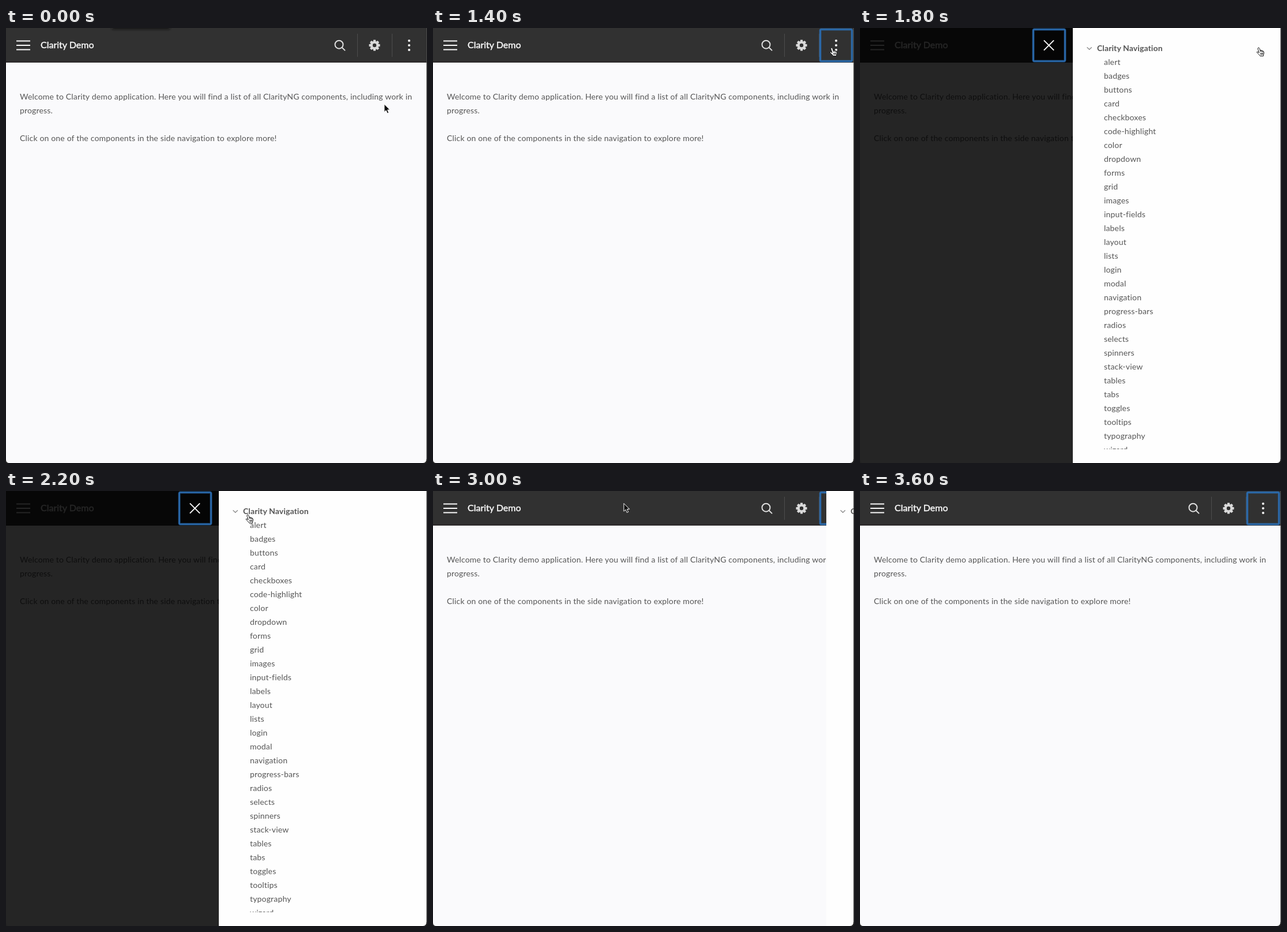
These frames come from a looping animation (730x754 px, 3800 ms). An HTML page:

```html
<!DOCTYPE html>
<html lang="en">
<head>
<meta charset="utf-8">
<title>Side navigation demo</title>
<style>
  html, body { margin: 0; width: 100%; height: 100%; overflow: hidden; background: #fafafc; }
  svg { display: block; width: 730px; height: 754px; }
  text { font: 14px Lato, "Open Sans", sans-serif; letter-spacing: .17px; fill: #565656; }
  .title { font-size: 16px; letter-spacing: 0; fill: #fafafa; stroke: #fafafa; stroke-width: .45px; }
  .head { font-weight: 700; letter-spacing: .1px; }
  .line { fill: none; stroke-linecap: round; stroke-linejoin: round; }
</style>
</head>
<body>
<svg viewBox="0 0 730 754">
  <defs>
    <clipPath id="listClip"><rect y="0" width="361" height="730"/></clipPath>
    <clipPath id="page"><rect width="729" height="754"/></clipPath>
    <filter id="blur" x="-20%" y="-200%" width="140%" height="500%"><feGaussianBlur stdDeviation="2"/></filter>
    <g id="ring" fill="none" stroke="#2b6cb0">
      <rect x="1.5" y="2.5" width="55" height="55" rx="2" stroke-width="4.4" opacity=".4"/>
      <rect x="1.5" y="2.5" width="55" height="55" rx="1.5" stroke-width="2.6"/>
    </g>
  </defs>

  <g clip-path="url(#page)">
    <rect width="730" height="754" fill="#fafafc"/>
    <text x="24" y="124">Welcome to Clarity demo application. Here you will find a list of all ClarityNG components, including work in</text>
    <text x="24" y="148">progress.</text>
    <text x="24" y="196">Click on one of the components in the side navigation to explore more!</text>

    <rect width="730" height="60" fill="#313131"/>
    <rect y="57" width="730" height="3" fill="#2e2c2d"/>
    <rect id="shade" x="184" y="-4" width="100" height="6" fill="#151515" filter="url(#blur)"/>
    <path d="M18 22.5H42M18 30H42M18 37.5H42" stroke="#fafafa" stroke-width="2"/>
    <text class="title" x="60" y="35">Clarity Demo</text>
    <path d="M609.5 10V50M669.5 10V50" stroke="#4c4c4c"/>
    <g class="line" stroke="#dedede" stroke-width="2">
      <circle cx="577.5" cy="28.7" r="7"/>
      <path d="M582.8 34L587.5 38.6"/>
    </g>
    <path id="gear" fill="#dadada" fill-rule="evenodd" transform="translate(639 30)"/>
    <g fill="#f2f2f2">
      <circle cx="699" cy="22" r="2.1"/><circle cx="699" cy="30" r="2.1"/><circle cx="699" cy="38" r="2.1"/>
    </g>
    <use id="menuRing" href="#ring" x="670"/>

    <g id="open">
      <rect width="730" height="754" opacity=".85"/>
      <g id="button">
        <rect x="1" y="2" width="56" height="56" fill="#050505"/>
        <use href="#ring"/>
      </g>
      <g stroke="#fafafa" stroke-width="1.9">
        <path id="barA" d="M-12.2 0H12.2"/><path id="barB" d="M-12.2 0H12.2"/>
      </g>
    </g>

    <g id="panel">
      <rect width="370" height="754" fill="#fefefe"/>
      <path class="line" d="M25 33.8L28.7 37.2L32.4 33.8" stroke="#8c8c8c" stroke-width="1.4"/>
      <text class="head" x="42" y="40">Clarity Navigation</text>
      <g id="list" clip-path="url(#listClip)"></g>
    </g>
  </g>

  <path d="M729.5 0V754" stroke="#4a4a4a"/>
  <path d="M0 754V748Q0 754 6 754ZM730 754H723Q729 754 729 747H730Z" fill="#222"/>

  <path id="arrow" d="M.4 0V13.7L3.5 10.8L5.7 15.9L8.2 14.8L6 9.9H10.2Z" fill="#0c0c0c" stroke="#fff" stroke-width="1" stroke-linejoin="round"/>
  <g id="hand" stroke="#111" stroke-width="1" stroke-linejoin="round" stroke-linecap="round">
    <path fill="#fff" d="M4.8 9L2.9 3.4Q2.5 1.4 3.8 1.1Q5.1 .8 5.8 2.6L7 6Q8.1 5.1 9 6.2Q10.3 5.5 11.1 6.9Q12.9 6.6 13.3 9Q13.7 12 12.6 13.5L12.4 15.6H6.8Q6 13.9 3.5 11.7Q.7 9.5 1.2 8.5Q2 7.3 4.8 9.7Z"/>
    <path fill="none" d="M7 6L7.6 8M9 6.2L9.5 8.1M11.1 6.9L11.5 8.5M7.6 10.6L8 13.2M9.5 10.4L9.8 13.1M11.3 10.2L11.5 12.8"/>
  </g>
</svg>
<script>
const LOOP = 3800, STEP = 200;
const $ = id => document.getElementById(id);
const show = (id, on) => $(id).setAttribute('display', on ? 'inline' : 'none');
const place = (id, x, y, turn = 0) =>
  $(id).setAttribute('transform', `translate(${x} ${y}) rotate(${turn})`);

const items = ('alert badges buttons card checkboxes code-highlight color dropdown forms grid images ' +
  'input-fields labels layout lists login modal navigation progress-bars radios selects spinners ' +
  'stack-view tables tabs toggles tooltips typography wizard').split(' ');
items.forEach((name, i) => {
  const row = document.createElementNS('http://www.w3.org/2000/svg', 'text');
  row.setAttribute('x', 54);
  row.setAttribute('y', 64 + 24 * i);
  row.textContent = name;
  $('list').append(row);
});

// Eight teeth, four corners each, around a round hole
const corners = [];
for (let i = 0; i < 8; i++) {
  for (const [r, a] of [[7, -.36], [9.7, -.2], [9.7, .2], [7, .36]]) {
    const angle = i * Math.PI / 4 + a;
    corners.push((r * Math.cos(angle)).toFixed(2) + ' ' + (r * Math.sin(angle)).toFixed(2));
  }
}
$('gear').setAttribute('d', `M${corners.join('L')}ZM3.2 0A3.2 3.2 0 1 0 -3.2 0A3.2 3.2 0 1 0 3.2 0Z`);

// Keys are [time, ...values]
const panelKeys = [[1400, 730], [1600, 408], [1800, 369], [2800, 369], [3000, 682], [3200, 730]];
const pointerKeys = [
  [400, 655.5, 132], [600, 666, 90], [800, 675, 31], [1000, 686, 26], [1200, 688, 22],
  [1400, 687, 33], [1800, 687, 33], [2000, 560, 44], [2200, 415, 40], [2400, 340, 30],
  [2600, 327, 22.5], [2800, 327, 22.5], [3000, 330.5, 21.5]
];

function at(keys, t) {
  const next = keys.findIndex(k => k[0] > t);
  if (next === 0) return keys[0].slice(1);
  if (next < 0) return keys[keys.length - 1].slice(1);
  const a = keys[next - 1], b = keys[next], p = (t - a[0]) / (b[0] - a[0]);
  return a.slice(1).map((v, i) => v + (b[i + 1] - v) * p);
}

function draw(ms) {
  const t = Math.floor((ms % LOOP) / STEP) * STEP;
  const [x] = at(panelKeys, t);
  const [px, py] = at(pointerKeys, t);
  const open = t >= 1600 && t < 3000;
  const hand = t >= 800 && t < 3000;

  show('shade', t < 200);
  show('menuRing', t >= 1400 && !open);
  show('open', open);
  place('panel', x, 0);
  place('button', x - 70, 0);

  // The two bars fold from a chevron into a cross
  const k = Math.min(1, Math.max(0, (408 - x) / 39));
  const cx = x - 38 - 3.5 * k, dy = 4.6 * (1 - k), turn = 22 + 23 * k;
  place('barA', cx, 30 - dy, turn);
  place('barB', cx, 30 + dy, -turn);

  show('hand', hand);
  show('arrow', !hand && t < 3400);
  place(hand ? 'hand' : 'arrow', px, py);
}

const start = performance.now();
function tick() {
  draw(performance.now() - start);
  requestAnimationFrame(tick);
}
tick();
</script>
</body>
</html>
```
